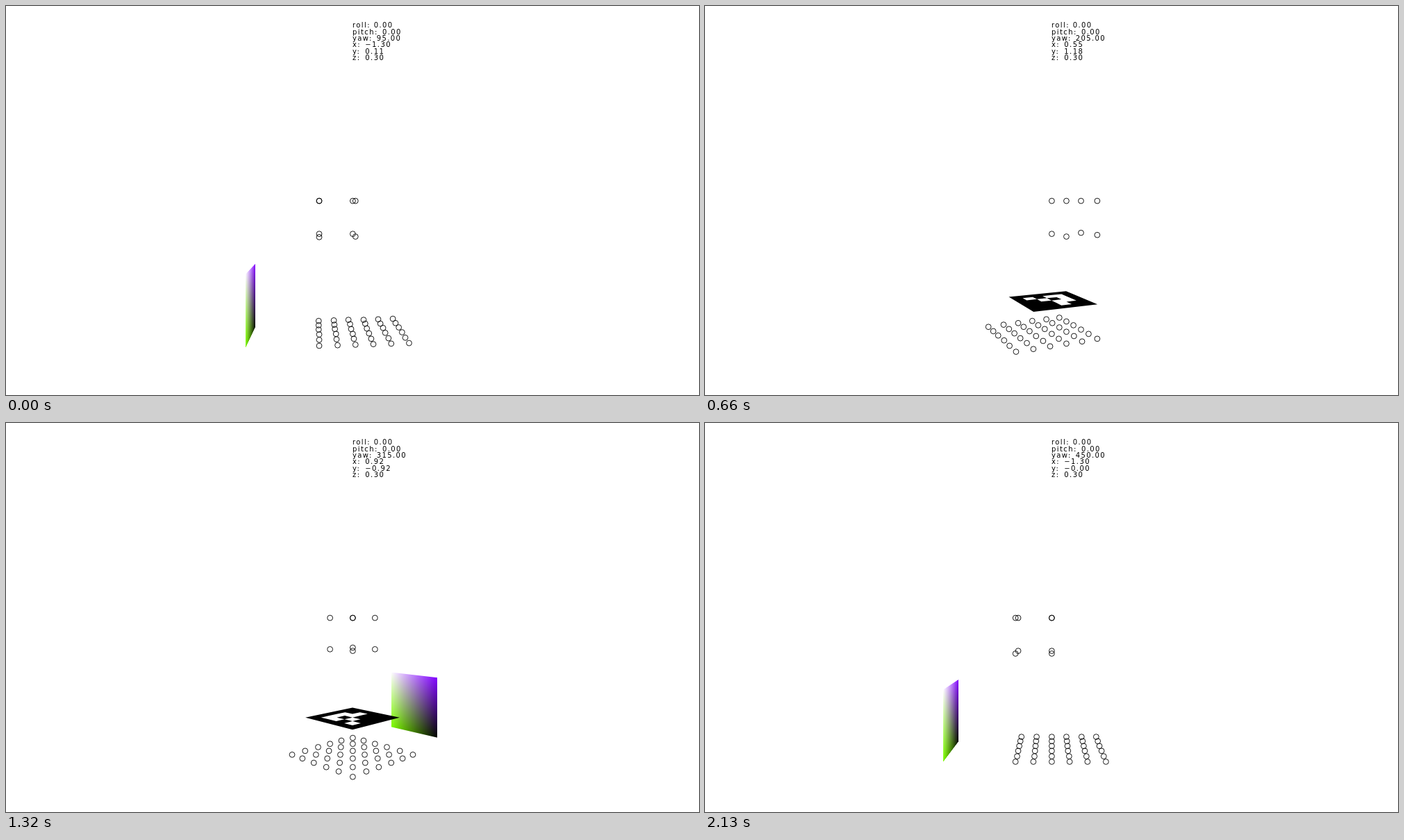
An HTML page with a canvas for the animation above (2.16 s loop, 998x561 px).

```html
<!DOCTYPE html>
<html lang="en">
<head>
<meta charset="utf-8">
<title>Orbiting camera</title>
<style>
  html, body { margin: 0; width: 100%; height: 100%; overflow: hidden; background: #fff; }
  canvas { display: block; }
</style>
</head>
<body>
<canvas id="stage" width="998" height="561"></canvas>
<script>
const ctx = document.getElementById('stage').getContext('2d');
const STEP = 30, STEPS = 72;
const SCALE = 998 / 1280;            // the scene is laid out on a 1280 x 720 view
const FOCAL = 800, CX = 640, CY = 360;
const RADIUS = 1.3, HEIGHT = 0.3;
const MARKER = ['1011', '0101', '0011', '0010'];

const lerp = (a, b, t) => a + (b - a) * t;

// Dots: a small cube and a 6 x 6 floor grid
const dots = [];
for (const x of [-0.1, 0])
  for (const y of [0, 0.1])
    for (const z of [0.2, 0.3]) dots.push([x, y, z]);
for (let i = 0; i < 6; i++)
  for (let j = 0; j < 6; j++) dots.push([-0.1 + i * 0.05, 0.1 - j * 0.05, -0.1]);

function makeCamera(yaw) {
  const a = yaw * Math.PI / 180, s = Math.sin(a), c = Math.cos(a);
  return {
    yaw, x: -RADIUS * s, y: -RADIUS * c, z: HEIGHT,
    project([x, y, z]) {
      const depth = RADIUS + x * s + y * c;
      return {
        x: CX + FOCAL * (x * c - y * s) / depth,
        y: CY + FOCAL * (HEIGHT - z) / depth,
        depth
      };
    }
  };
}

function tracePolygon(cam, points) {
  points.forEach((point, i) => {
    const p = cam.project(point);
    ctx[i ? 'lineTo' : 'moveTo'](p.x * SCALE, p.y * SCALE);
  });
  ctx.closePath();
}

// Upright colour square, painted column by column
function drawPanel(cam) {
  const corner = (x, z) => cam.project([x, 0.3, z]);
  const tl = corner(-0.1, 0.1), tr = corner(0.1, 0.1);
  const bl = corner(-0.1, -0.1), br = corner(0.1, -0.1);
  const left = tl.x * SCALE, right = tr.x * SCALE;
  const shade = (u, v) =>
    `rgb(${255 * (1 - (u + v) / 2)}, ${255 * (1 - u)}, ${255 * (1 - v)})`;
  for (let px = Math.round(left); px < Math.round(right); px++) {
    const t = (px + 0.5 - left) / (right - left);
    const u = (t / tr.depth) / lerp(1 / tl.depth, 1 / tr.depth, t);
    const top = lerp(tl.y, tr.y, t) * SCALE;
    const bottom = lerp(bl.y, br.y, t) * SCALE;
    const fill = ctx.createLinearGradient(0, top, 0, bottom);
    fill.addColorStop(0, shade(u, 0));
    fill.addColorStop(1, shade(u, 1));
    ctx.fillStyle = fill;
    ctx.fillRect(px, top, 1, bottom - top);
  }
}

// Flat square of 6 x 6 cells with a black rim
function drawMarker(cam) {
  const at = (col, row) => [0.1 - col / 30, -0.1 + row / 30, 0];
  const square = (col, row, size) => tracePolygon(cam, [
    at(col, row), at(col + size, row), at(col + size, row + size), at(col, row + size)
  ]);
  ctx.fillStyle = '#000';
  ctx.beginPath();
  square(0, 0, 6);
  ctx.fill();
  ctx.fillStyle = '#fff';
  ctx.beginPath();
  MARKER.forEach((bits, row) => [...bits].forEach((bit, col) => {
    if (bit === '1') square(col + 1, row + 1, 1);
  }));
  ctx.fill();
}

function drawDots(cam) {
  ctx.strokeStyle = '#000';
  ctx.lineWidth = 0.9;
  const snap = v => (Math.floor(v + 1e-6) + 0.5) * SCALE;
  for (const dot of dots) {
    const p = cam.project(dot);
    ctx.beginPath();
    ctx.arc(snap(p.x), snap(p.y), 5 * SCALE, 0, 2 * Math.PI);
    ctx.stroke();
  }
}

function drawReadout(cam) {
  const rows = [
    ['roll:', 0, 529.7], ['pitch:', 0, 541.9], ['yaw:', cam.yaw, 533.7],
    ['x:', cam.x, 517.3], ['y:', cam.y, 517.3], ['z:', cam.z, 517.3]
  ];
  ctx.fillStyle = '#000';
  ctx.font = '10px "DejaVu Sans", Verdana, sans-serif';
  ctx.letterSpacing = '1.4px';
  rows.forEach(([label, value, x], i) => {
    const y = (40 + 12 * i) * SCALE;
    ctx.fillText(label, 499, y);
    ctx.fillText(value.toFixed(2).replace('-', '\u2212'), x, y);
  });
}

function draw(step) {
  const cam = makeCamera(95 + 5 * step);
  ctx.fillStyle = '#fff';
  ctx.fillRect(0, 0, 998, 561);
  // Each square shows from one side only
  if (cam.y < 0.3) drawPanel(cam);
  if (cam.x > 1e-9) drawMarker(cam);
  drawDots(cam);
  drawReadout(cam);
}

const start = performance.now();
function tick() {
  draw(Math.floor((performance.now() - start) / STEP) % STEPS);
  requestAnimationFrame(tick);
}
tick();
</script>
</body>
</html>
```
